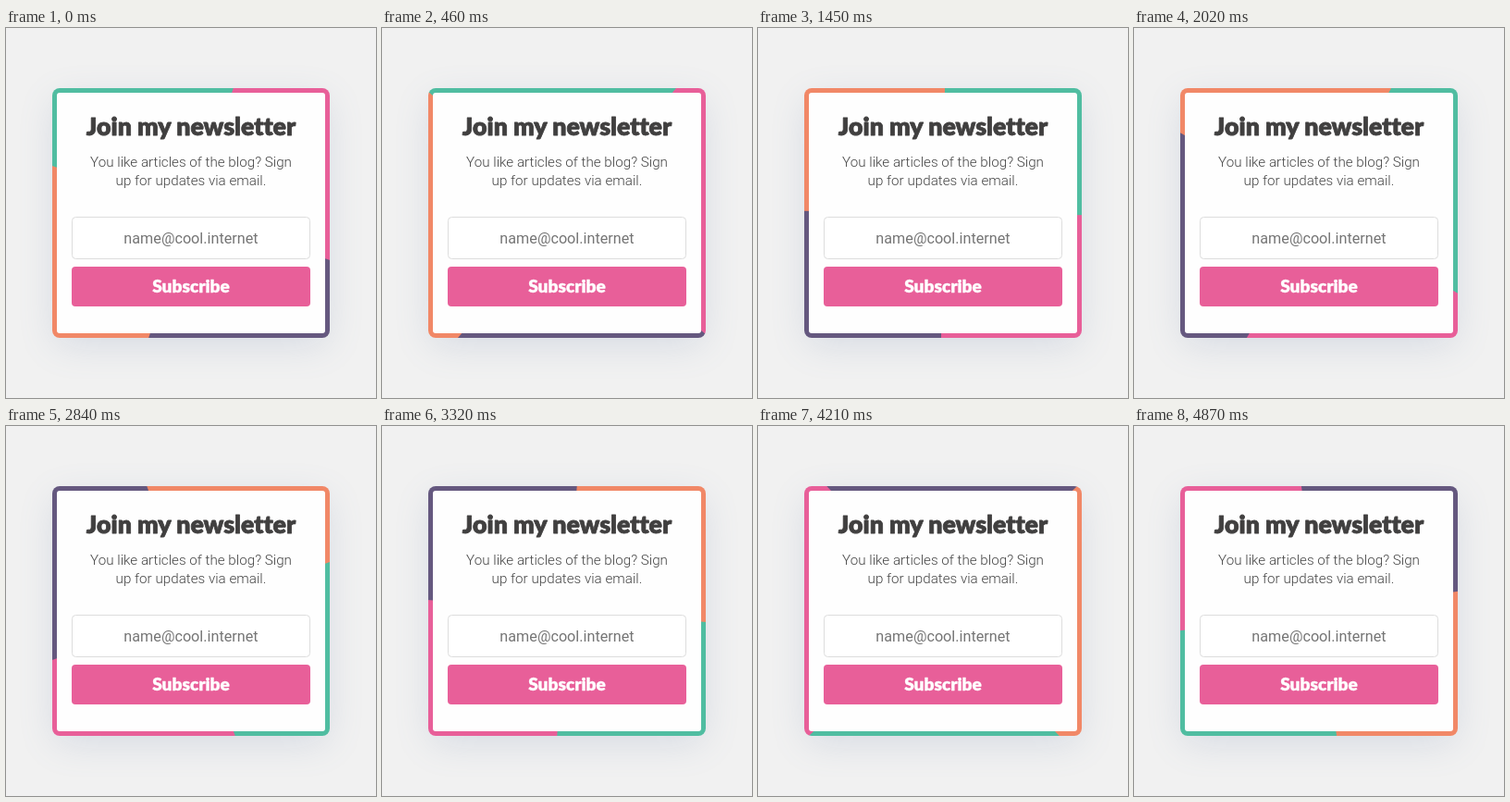
Recreate the animation shown at these times as an HTML page. Size 400x400 px, loop 4900 ms.

```html
<!DOCTYPE html>
<html lang="en">
<head>
<meta charset="utf-8">
<title>Newsletter card</title>
<style>
  :root {
    --pink: #e85f99;
    --purple: #65587f;
    --orange: #f18867;
    --teal: #50bda1;
  }
  html, body {
    width: 100%;
    height: 100%;
    margin: 0;
    overflow: hidden;
    background: #f1f1f1;
  }
  .card {
    position: absolute;
    left: 50px;
    top: 65px;
    width: 300px;
    height: 270px;
    border-radius: 8px;
    overflow: hidden;
    box-shadow: 0 10px 40px -4px rgba(100, 125, 170, .2);
  }
  .wheel {
    position: absolute;
    left: -60px;
    top: -75px;
    width: 420px;
    height: 420px;
    background: conic-gradient(
      var(--pink) 0 25%, var(--purple) 0 50%,
      var(--orange) 0 75%, var(--teal) 0);
  }
  .panel {
    position: absolute;
    inset: 5px;
    border-radius: 3px;
    background: #fefefe;
  }
  svg {
    position: absolute;
    left: 0;
    top: 0;
  }
  text { text-anchor: middle; }
  .round {
    font-family: Lato, sans-serif;
    font-weight: 900;
    font-variant-ligatures: none;
    stroke-linejoin: round;
    paint-order: stroke;
  }
  .title { font-size: 26.7px; fill: #403f3f; stroke: #403f3f; stroke-width: .8px; }
  .action { font-size: 19.1px; fill: #fff; stroke: #fff; stroke-width: .4px; }
  .copy { font: 300 15.2px Roboto, sans-serif; fill: #444; }
  .hint { font: 400 16.2px Roboto, sans-serif; fill: #757575; }
</style>
</head>
<body>
  <div class="card">
    <div class="wheel"></div>
    <div class="panel"></div>
  </div>
  <svg width="400" height="400" viewBox="0 0 400 400">
    <text class="round title" x="200" y="116">Join my newsletter</text>
    <text class="copy" x="200" y="150">You like articles of the blog? Sign</text>
    <text class="copy" x="200" y="170">up for updates via email.</text>
    <rect x="71.5" y="204.5" width="257" height="45" rx="4" fill="#fff" stroke="#ddd"/>
    <text class="hint" x="200" y="233">name@cool.internet</text>
    <rect x="71" y="258" width="258" height="43" rx="4" fill="var(--pink)"/>
    <text class="round action" x="200" y="286">Subscribe</text>
  </svg>
  <script>
    const LOOP = 4900;
    // [time in ms, wheel angle in degrees]
    const turns = [
      [0, 18.7], [880, 61.6], [2020, 120], [2840, 160.5],
      [3320, 184.5], [4210, 227], [4870, 261.9], [LOOP, 263.4]
    ];
    document.querySelector('.wheel').animate(
      turns.map(([time, angle]) => ({
        offset: time / LOOP,
        transform: `rotate(${angle}deg)`
      })),
      { duration: LOOP, iterations: Infinity }
    );
  </script>
</body>
</html>
```
